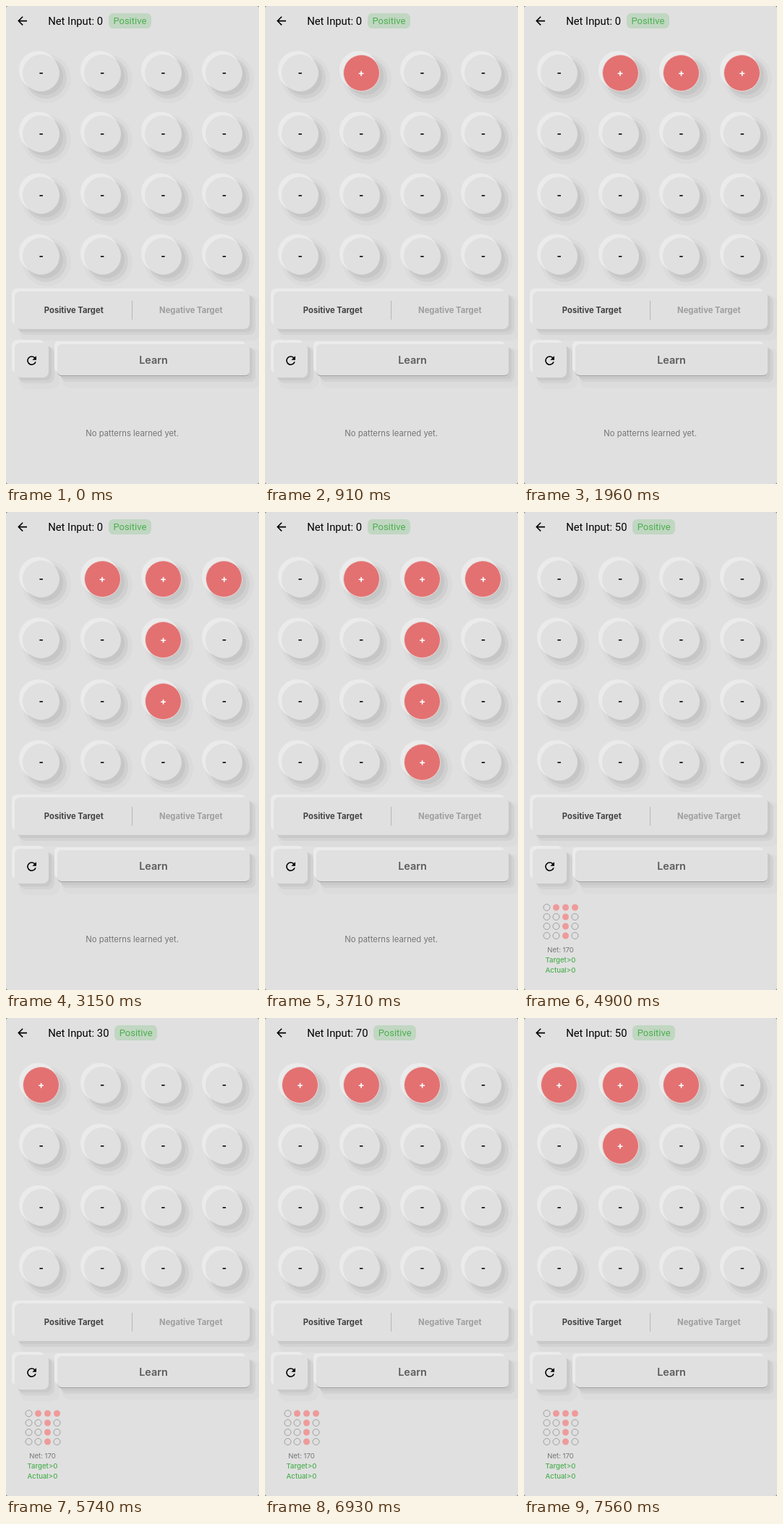
An HTML page that plays this animation: 350 by 660 pixels, repeating every 8000 ms.

```html
<!DOCTYPE html>
<html lang="en">
<head>
<meta charset="utf-8">
<title>Pattern learner</title>
<style>
  html, body { margin: 0; width: 100%; height: 100%; overflow: hidden; background: #777; }
  #stage { position: relative; width: 350px; height: 660px; overflow: hidden; border-radius: 3px;
    background: #e0e0e0; font: 11.25px Inter, sans-serif; color: #757575; }
  #stage > * { position: absolute; box-sizing: border-box; }
  .label { transform: translate(-50%, -50%); white-space: nowrap; line-height: 1; }
  .bold { font-weight: 700; }
  .small { font-size: 9.6px; }
  .green { color: #4caf50; font-weight: 500; }

  #header { left: 58.2px; top: 10px; height: 21px; display: flex; align-items: center; gap: 7.8px;
    font: 14.8px Roboto, sans-serif; color: #000; }
  #chip { padding: 0 6.4px; border-radius: 6.4px; background: #c1d7c2; color: #4caf50;
    font-size: 13px; line-height: 21.5px; }

  .cell { width: 51px; height: 51px; border: 1px solid #e0e0e0; border-radius: 50%;
    background: #e0e0e0; color: #000; font-size: 13.5px; font-weight: 700; line-height: 49px; text-align: center;
    box-shadow: -4px -4px 0 1px #ebebeb, 5px 5px 0 #c6c6c6, 7px 7px 0 3px #d0d0d0, 8px 8px 0 8px #dbdbdb; }
  .cell.on { background: #e37171; border-color: #ecd6d6; color: #fff; }

  .panel { border-radius: 8px; background: #e0e0e0;
    box-shadow: -5px -5px 0 -1px #ebebeb, 4px 4px 1px #c9c9c9, 7px 7px 1px 1px #d2d2d2, 11px 11px 0 5px #dcdcdc; }
  #learn { left: 71px; top: 467px; width: 266px; height: 44px; border-radius: 6px;
    border-bottom: 1px solid #a0a0a0; color: #5c5c5c; font-size: 14.4px; font-weight: 600;
    line-height: 44px; text-align: center; }
</style>
</head>
<body>
<div id="stage">
  <svg style="left:12.6px;top:10.7px" width="19.2" height="19.2" viewBox="0 0 24 24">
    <path d="M20 11H7.8l5.6-5.6L12 4l-8 8 8 8 1.4-1.4L7.8 13H20z"/>
  </svg>
  <div id="header"><span id="net"></span><span id="chip">Positive</span></div>

  <div class="panel" style="left:12px;top:394px;width:325px;height:52px"></div>
  <div style="left:174px;top:407px;width:1px;height:26px;background:#b8b8b8"></div>
  <span class="label bold" style="left:93.8px;top:421.2px;color:#424242">Positive Target</span>
  <span class="label bold" style="left:255.8px;top:421.2px;color:#9e9e9e">Negative Target</span>

  <div class="panel" style="left:12px;top:465px;width:47px;height:48px"></div>
  <svg style="left:25.8px;top:479.7px" width="19.2" height="19.2" viewBox="0 0 24 24">
    <path d="M17.65 6.35A8 8 0 1 0 19.73 14h-2.08A6 6 0 1 1 16.22 7.78L13 11h7V4z"/>
  </svg>
  <div class="panel" id="learn">Learn</div>

  <span class="label" id="empty" style="left:174.7px;top:590.8px">No patterns learned yet.</span>
  <div id="history">
    <svg id="dots" style="position:absolute;left:0;top:0" width="100" height="660"></svg>
    <span class="label small" id="score" style="position:absolute;left:50.5px;top:605px"></span>
    <span class="label small green" style="position:absolute;left:50.5px;top:619px">Target&gt;0</span>
    <span class="label small green" style="position:absolute;left:50.5px;top:633px">Actual&gt;0</span>
  </div>
</div>
<script>
  const LOOP = 8000, LEARN_AT = 4480, RATE = 10;
  // [time, cell] for every tap on the grid
  const taps = [
    [910, 1], [1400, 2], [1960, 3], [2520, 6], [3150, 10], [3710, 14],
    [5740, 0], [6370, 1], [6930, 2], [7560, 5]
  ];
  const $ = id => document.getElementById(id);
  const stage = $('stage');

  const inputsAt = (from, to) => {
    const inputs = Array(16).fill(-1);
    for (const [time, cell] of taps) if (time >= from && time <= to) inputs[cell] = 1;
    return inputs;
  };
  const pattern = inputsAt(0, LEARN_AT);
  // One Hebbian step: weights and bias move towards the pattern
  const netInput = inputs => inputs.reduce((sum, x, i) => sum + x * pattern[i] * RATE, RATE);

  const cells = pattern.map((_, i) => {
    const cell = document.createElement('div');
    cell.style.left = 23.2 + (i % 4) * 84.4 + 'px';
    cell.style.top = 66.9 + (i >> 2) * 84.4 + 'px';
    stage.append(cell);
    return cell;
  });

  $('dots').innerHTML = pattern.map((x, i) =>
    `<circle cx="${31.5 + (i % 4) * 13}" cy="${546 + (i >> 2) * 13}" r="4.5"
      ${x > 0 ? 'fill="#ef9a9a"' : 'fill="none" stroke="#9e9e9e"'}/>`).join('');
  $('score').textContent = 'Net: ' + netInput(pattern);

  function ripple(age) {
    if (age < 0 || age >= 420) return '';
    if (age >= 140) return '#d6d6d6';
    const r = age < 70 ? 40 : 85;
    return `radial-gradient(circle, #c9c9c9 ${r * .55}px, #d0d0d0 ${r * .97}px, #dadada ${r}px)`;
  }

  function draw(t) {
    const learned = t >= LEARN_AT;
    const inputs = inputsAt(learned ? LEARN_AT : 0, t);
    cells.forEach((cell, i) => {
      const on = inputs[i] > 0;
      cell.className = on ? 'cell on' : 'cell';
      cell.textContent = on ? '+' : '-';
    });
    $('net').textContent = 'Net Input: ' + (learned ? netInput(inputs) : 0);
    $('empty').hidden = learned;
    $('history').hidden = !learned;
    $('learn').style.background = ripple(t - LEARN_AT);
  }

  const start = performance.now();
  function tick() {
    draw((performance.now() - start) % LOOP);
    requestAnimationFrame(tick);
  }
  tick();
</script>
</body>
</html>
```
